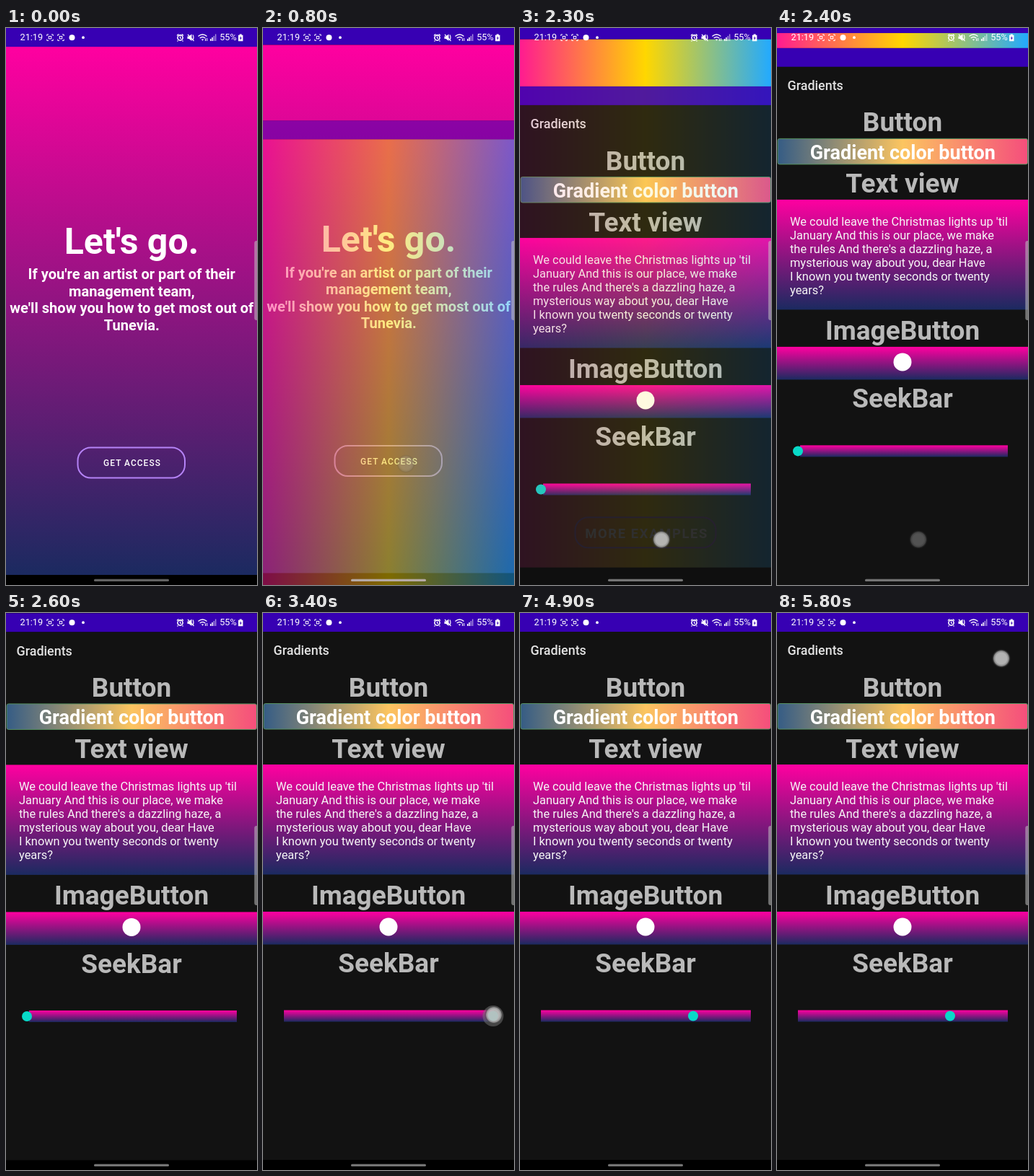
Recreate the animation shown at these times as an HTML page. Size 348 by 772 pixels, loop 5900 ms.

```html
<!DOCTYPE html>
<html lang="en">
<head>
<meta charset="utf-8">
<title>Gradients</title>
<style>
  html, body { margin: 0; width: 100%; height: 100%; overflow: hidden; background: #000; }
  svg { display: block; width: 348px; height: 772px; font-family: Roboto, sans-serif; }
  .mid { text-anchor: middle; }
  .bold { font-weight: 700; }
  .head { font-size: 37px; font-weight: 700; text-anchor: middle; fill: #b9b9b9; }
  .outline { fill: none; stroke: #b583f7; stroke-width: 2; }
</style>
</head>
<body>
<svg viewBox="0 0 348 772" xmlns="http://www.w3.org/2000/svg">
  <defs>
    <linearGradient id="dusk" x2="0" y2="1">
      <stop stop-color="#ff00a0"/><stop offset="1" stop-color="#1b2a60"/>
    </linearGradient>
    <linearGradient id="rainbow">
      <stop stop-color="#ff1b90"/><stop offset=".5" stop-color="#ffd700"/><stop offset="1" stop-color="#22aaff"/>
    </linearGradient>
    <linearGradient id="sunset">
      <stop stop-color="#355c85"/><stop offset=".5" stop-color="#fcc560"/><stop offset="1" stop-color="#f54e7c"/>
    </linearGradient>
    <radialGradient id="finger">
      <stop offset=".6" stop-color="#c0c0c0" stop-opacity=".92"/>
      <stop offset=".8" stop-color="#9a9a9a" stop-opacity=".85"/>
      <stop offset=".86" stop-color="#555" stop-opacity=".7"/>
      <stop offset="1" stop-color="#444" stop-opacity="0"/>
    </radialGradient>
  </defs>
  <rect width="348" height="772"/>

  <g id="welcome">
    <rect width="348" height="772"/>
    <rect width="348" height="26" fill="#3700b3"/>
    <rect y="26" width="348" height="732" fill="url(#dusk)"/>
    <g class="mid bold" fill="#fff">
      <text x="174" y="313" font-size="50">Let's go.</text>
      <g font-size="20.1">
        <text x="174.3" y="348.3">If you're an artist or part of their</text>
        <text x="174.3" y="371.9">management team,</text>
        <text x="174.3" y="395.4">we'll show you how to get most out of</text>
        <text x="174.3" y="419">Tunevia.</text>
      </g>
    </g>
    <rect class="outline" x="99.5" y="581.5" width="148.5" height="42" rx="18"/>
    <text class="mid" x="175" y="607.3" font-size="11.9" font-weight="500" letter-spacing="1.06" fill="#fff">GET ACCESS</text>
  </g>

  <g id="stripes">
    <rect width="348" height="772"/>
    <rect width="348" height="26" fill="#3700b3"/>
    <rect y="26" width="348" height="732" fill="url(#rainbow)"/>
    <rect class="outline" x="76.5" y="688.5" width="195" height="42" rx="18"/>
    <text class="mid bold" x="175.6" y="717" font-size="18.4" letter-spacing="1.64" fill="#fff">MORE EXAMPLES</text>
  </g>

  <g id="examples">
    <rect width="348" height="772"/>
    <rect width="348" height="26" fill="#3700b3"/>
    <rect y="26" width="348" height="732" fill="#121212"/>
    <text x="14.5" y="58.4" font-size="17.9" font-weight="500" fill="#e2e2e2">Gradients</text>
    <text class="head" x="174" y="115.6">Button</text>
    <rect x="1" y="125.5" width="346.5" height="35.5" rx="2.5" fill="url(#sunset)" stroke="#55905f"/>
    <text class="mid bold" x="174.3" y="153.7" font-size="27" fill="#fff">Gradient color button</text>
    <text class="head" x="174" y="200.6">Text view</text>
    <rect y="210" width="348" height="152.5" fill="url(#dusk)"/>
    <g id="verse" font-size="16.4" fill="#f6f6f6"></g>
    <text class="head" x="174" y="404">ImageButton</text>
    <rect y="414" width="348" height="45.5" fill="url(#dusk)"/>
    <circle cx="174" cy="435" r="12.5" fill="#fff"/>
    <text class="head" x="174" y="498.4">SeekBar</text>
    <rect id="track" y="550.5" height="16" fill="url(#dusk)"/>
    <circle id="halo" cy="558.5" r="14.5" fill="#777" fill-opacity=".5"/>
    <circle id="thumb" cy="558.5" r="7" fill="#08dac8"/>
  </g>

  <g fill="#fff" stroke="none">
    <text x="19.5" y="17.3" font-size="12.7">21:19</text>
    <g id="scan" fill="none" stroke="#fff" stroke-width="1">
      <path d="M56.8 11V9h2.2M63 9h2.2v2M65.200 15.500v2h-2.200M59 17.500h-2.200v-2"/>
      <rect x="59.300" y="11.500" width="3.400" height="3.400"/>
    </g>
    <use href="#scan" x="15"/>
    <circle cx="91.500" cy="13.300" r="4"/>
    <circle cx="107" cy="13.200" r="1.900"/>
    <g fill="none" stroke="#fff">
      <circle cx="241.500" cy="13.500" r="3.600" stroke-width="1.600"/>
      <path d="M237 10.500l2.300-2M246 10.500l-2.300-2M241.500 11.500v2.300l1.500 1M238.500 17.500l-1 1M244.500 17.500l1 1" stroke-width="1.200"/>
      <path d="M252 9l8.500 9M259 9.500q2 3.500 0 7" stroke-width="1.200"/>
      <path d="M266.500 11.500q6-5 12 0M268.800 14q3.700-3 7.400 0" stroke-width="1.400"/>
      <path d="M276.500 18v-3.500M278.700 14v4" stroke-width="1"/>
    </g>
    <path d="M251.500 11.500h2.200l3.800-3v9.500l-3.800-3h-2.200zM270.800 15.500h3.400l-1.700 2.300z"/>
    <path d="M283 15h1.500v3h-1.500zM285.300 13h1.500v5h-1.500z"/>
    <path d="M287.600 11h1.500v7h-1.500zM289.900 8.500h1.500v9.500h-1.500z" opacity=".55"/>
    <text x="296.200" y="17.300" font-size="12.700">55%</text>
    <path d="M323.800 8.500h3v1.200h1.700v8.600h-6.400v-8.600h1.700z"/>
    <path d="M326 11l-2.300 3.400h1.500l-.6 2.600 2.400-3.500h-1.600z" fill="#3700b3"/>
  </g>
  <rect x="344.300" y="295" width="8" height="110" rx="3" fill="#c4c4c4" fill-opacity=".55"/>
  <rect id="pill" x="122" y="763.700" width="104" height="3.300" rx="1.600"/>
  <circle id="touch" r="13" fill="url(#finger)"/>
</svg>
<script>
const LOOP = 5900, STEP = 100;
const SLIDE = 500, FADE = 186, RISE = 144, LIFT = 23.5;
const OPEN1 = 708, OPEN2 = 2137;
const el = id => document.getElementById(id);
const clamp = v => Math.max(0, Math.min(1, v));
const set = (id, attrs) => {
  for (const k in attrs) el(id).setAttribute(k, attrs[k]);
};

el("verse").innerHTML = [
  "We could leave the Christmas lights up 'til",
  "January And this is our place, we make",
  "the rules And there's a dazzling haze, a",
  "mysterious way about you, dear Have",
  "I known you twenty seconds or twenty",
  "years?"
].map((line, i) => `<text x="18" y="${245.8 + i * 19}">${line}</text>`).join("");

// cubic-bezier(.4, 0, .2, 1)
function ease(x) {
  let lo = 0, hi = 1;
  for (let i = 0; i < 30; i++) {
    const s = (lo + hi) / 2, r = 1 - s;
    if (1.2 * s * r * r + 0.6 * s * s * r + s * s * s < x) lo = s; else hi = s;
  }
  return lo * lo * (3 - 2 * lo);
}

// Smooth path through [time, value] pairs
function along(keys, t) {
  if (t <= keys[0][0]) return keys[0][1];
  for (let i = 1; i < keys.length; i++) {
    const [t0, a] = keys[i - 1], [t1, b] = keys[i];
    if (t <= t1) {
      const u = (t - t0) / (t1 - t0);
      return a + (b - a) * u * u * (3 - 2 * u);
    }
  }
  return keys[keys.length - 1][1];
}

const seekX = [[2900, 29], [3400, 319], [3900, 29], [4100, 128], [4500, 240]];
const fingerY = [[3400, 557], [3900, 616], [4100, 609], [4500, 616]];

function touchAt(t) {
  if (t >= 500 && t <= 800) return [198, 604, t < 800 ? 0.85 : 0.25];
  if (t >= 2000 && t <= 2400) return [196, 709, t < 2400 ? 1 : 0.4];
  if (t >= 2900 && t <= 4600) return [along(seekX, t) + 1, along(fingerY, t), t < 4600 ? 1 : 0.4];
  if (t >= 5800) return [311, 63, 1];
  return [0, 0, 0];
}

function swap(from, to, dt) {
  const p = ease(clamp(dt / SLIDE));
  set(from, { transform: `translate(0 ${-LIFT * p})`, visibility: p < 1 ? "visible" : "hidden" });
  set(to, {
    transform: `translate(0 ${RISE * (1 - p)})`,
    opacity: clamp(dt / FADE),
    visibility: dt > 0 ? "visible" : "hidden"
  });
}

function pillColor(t) {
  if (t < OPEN1) return "#626262";
  if (t < 1000) return "#b5a9a4";
  return t <= 2200 ? "#303030" : "#747474";
}

function draw(t) {
  if (t <= 2200) {
    swap("welcome", "stripes", t - OPEN1);
    set("examples", { visibility: "hidden" });
  } else {
    set("welcome", { visibility: "hidden" });
    set("stripes", { opacity: 1 });
    swap("stripes", "examples", t - OPEN2);
  }
  const x = along(seekX, t), left = x < 32 ? 32 : 29;
  set("track", { x: left, width: 320 - left });
  set("thumb", { cx: x });
  set("halo", { cx: x, opacity: t >= 2900 && t < 4600 ? 1 : 0 });
  const [tx, ty, alpha] = touchAt(t);
  set("touch", { cx: tx, cy: ty, opacity: alpha });
  set("pill", { fill: pillColor(t) });
}

const start = performance.now();
function tick() {
  const t = (performance.now() - start) % LOOP;
  draw(Math.floor(t / STEP) * STEP);
  requestAnimationFrame(tick);
}
tick();
</script>
</body>
</html>
```
